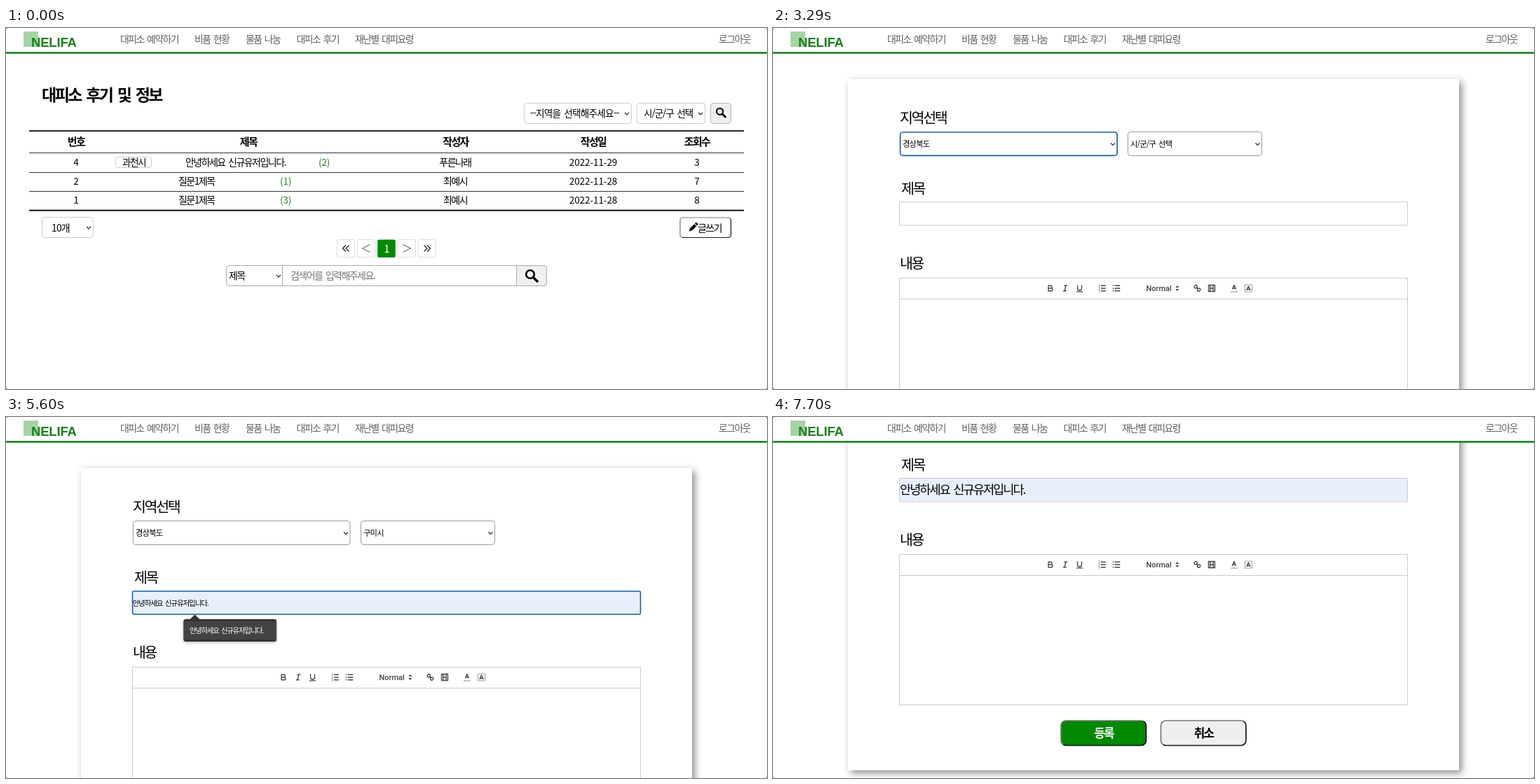
Animation of 1086 by 516 pixels, one loop 8 s. Source, as an HTML page with a canvas:

```html
<!DOCTYPE html>
<html lang="ko">
<head>
<meta charset="utf-8">
<title>대피소 후기</title>
<style>
html, body { margin: 0; width: 100%; height: 100%; overflow: hidden; background: #fff; }
canvas { display: block; }
</style>
</head>
<body>
<canvas id="stage" width="1086" height="516"></canvas>
<script>
const W = 1086, H = 516, LOOP = 8000, STEP = 70;
const SANS = '"Noto Sans CJK KR", "Noto Sans CJK JP", "Noto Sans CJK", sans-serif';
const GREEN = '#028802', DARK_GREEN = '#1b7f1b', BLUE = '#1a5f9f', FILL = '#e8f0fe';
const REGION_HINT = '--지역을 선택해주세요--', CITY_HINT = '시/군/구 선택';
const GREETING = '안녕하세요 신규유저입니다.';
const REGIONS = [REGION_HINT, ...('서울특별시 부산광역시 대구광역시 인천광역시 광주광역시 대전광역시 울산광역시 ' +
  '세종특별자치시 경기도 강원도 충청북도 충청남도 전라북도 전라남도 경상북도 경상남도 제주특별자치도').split(' ')];
const CITIES = [CITY_HINT, ...('경산시 경주시 구미시 김천시 문경시 상주시 안동시 영주시 영천시 포항시 고령군 군위군 ' +
  '봉화군 성주군 영덕군 영양군 예천군 울릉군 울진군 의성군 청도군 청송군 칠곡군').split(' ')];

const main = document.getElementById('stage').getContext('2d');
const layerCanvas = Object.assign(document.createElement('canvas'), { width: W, height: H });
const layer = layerCanvas.getContext('2d');
let g = main;

// y is the vertical centre of the glyphs; sp is letter spacing in em
function text(s, x, y, size, o = {}) {
  const hangul = /[가-힣]/.test(s);
  g.font = `${o.weight || 400} ${size}px ${o.font || SANS}`;
  g.letterSpacing = (o.sp ?? (hangul ? -0.11 : -0.01)) * size + 'px';
  g.wordSpacing = (hangul ? 0.2 * size : 0) + 'px';
  g.textAlign = o.align || 'left';
  g.fillStyle = o.color || '#000';
  g.fillText(s, x, y + size * 0.37);
}
const mid = (s, x, y, size, o) => text(s, x, y, size, { align: 'center', ...o });

function rect(x, y, w, h, color) {
  g.fillStyle = color;
  g.fillRect(x, y, w, h);
}

function box(x, y, w, h, r, stroke, fill, lw = 1) {
  g.beginPath();
  g.roundRect(x, y, w, h, r);
  if (fill) { g.fillStyle = fill; g.fill(); }
  if (stroke) { g.strokeStyle = stroke; g.lineWidth = lw; g.stroke(); }
}

function line(points, color, lw) {
  g.beginPath();
  points.forEach(([x, y]) => g.lineTo(x, y));
  g.strokeStyle = color;
  g.lineWidth = lw;
  g.stroke();
}

const chevron = (x, y) => line([[x - 3, y - 1.5], [x, y + 1.5], [x + 3, y - 1.5]], '#222', 1.1);
const angle = (x, y, w, h, color, lw) => line([[x + w, y - h], [x, y], [x + w, y + h]], color, lw);

function magnifier(x, y, r) {
  g.beginPath();
  g.arc(x, y, r, 0, 7);
  g.strokeStyle = '#000';
  g.lineWidth = r * 0.45;
  g.stroke();
  line([[x + r * 0.75, y + r * 0.75], [x + r * 1.9, y + r * 1.9]], '#000', r * 0.58);
}

// Border lit from the top left, split along the rising diagonal
function bevel(x, y, w, h, r, fill, lw) {
  const cx = x + w / 2, cy = y + h / 2;
  const shade = g.createLinearGradient(cx - h, cy - w, cx + h, cy + w);
  shade.addColorStop(0.5, '#767676');
  shade.addColorStop(0.5, '#151515');
  box(x, y, w, h, r, shade, fill, lw);
}

function header() {
  rect(0, 0, W, 34.3, '#fff');
  rect(0, 34.2, W, 2.6, DARK_GREEN);
  rect(25, 5, 21, 22, '#a5d3a5');
  text('NELIFA', 36, 20.5, 18.5, { weight: 700, color: DARK_GREEN, font: '"Liberation Sans", sans-serif' });
  [['대피소 예약하기', 163], ['비품 현황', 269], ['물품 나눔', 342], ['대피소 후기', 414.5],
    ['재난별 대피요령', 498], ['로그아웃', 1017]].forEach(([s, x]) => text(s, x, 16.3, 13.9, { color: '#606060' }));
}

function listPage() {
  text('대피소 후기 및 정보', 51, 95, 23, { weight: 700 });
  box(739.5, 107.5, 153, 29, 4, '#ccc');
  text(REGION_HINT, 748, 122, 13.7, { sp: -0.06 });
  chevron(886, 122.5);
  box(900.5, 107.5, 97, 29, 4, '#ccc');
  text(CITY_HINT, 910, 122, 13.6, { sp: -0.08 });
  chevron(991, 122.5);
  box(1005.5, 107.5, 29, 29, 4, '#b0b4ba', '#efefef');
  magnifier(1018.7, 119.3, 4.6);

  rect(33, 146.2, 1020, 1.8, '#111');
  [['번호', 100], ['제목', 346], ['작성자', 641.5], ['작성일', 838], ['조회수', 986]]
    .forEach(([s, x]) => mid(s, x, 162, 15, { weight: 700 }));
  [178, 206, 233].forEach(y => rect(33, y, 1020, 1, '#333'));
  rect(33, 259.7, 1020, 2, '#111');

  box(156.5, 184.5, 51, 15, 3, '#ccc');
  mid('과천시', 182.5, 192, 13.8);
  [['4', GREETING, 256, '(2)', 446, '푸른나래', '2022-11-29', '3'],
    ['2', '질문1제목', 246, '(1)', 391, '최예시', '2022-11-28', '7'],
    ['1', '질문1제목', 246, '(3)', 391, '최예시', '2022-11-28', '8']].forEach((r, i) => {
    const y = 192 + i * 27;
    mid(r[0], 100, y, 13.6);
    text(r[1], r[2], y, 14);
    text(r[3], r[4], y, 13.6, { color: '#2b802b' });
    mid(r[5], 641, y, 14);
    mid(r[6], 838, y, 13.6);
    mid(r[7], 986, y, 13.6);
  });

  box(51.5, 270.5, 73, 29, 4, '#ccc');
  text('10개', 65, 285.5, 14, { sp: -0.06 });
  chevron(118, 285.5);
  bevel(962, 271, 72.5, 28.5, 4, '#fff', 1.2);
  g.fillStyle = '#000';
  g.fill(new Path2D('M975 290.5l.7-3.7 6.6-6.6 3 3-6.6 6.6zM983 279.5l1.2-1.2q.9-.6 1.7.1l1.3 1.3q.6.8 0 1.6l-1.2 1.2z'));
  text('글쓰기', 987, 285.5, 14);

  [472.5, 501.4, 559.2, 588.1].forEach(x => box(x, 302.5, 25, 25, 2, '#ddd'));
  box(530.2, 302.4, 25.6, 25.6, 2, null, GREEN);
  mid('1', 543.3, 315, 15, { color: '#fff' });
  [0, 4.5].forEach(d => {
    angle(480.5 + d, 315, 4.5, 4.5, '#222', 1.3);
    angle(605.5 - d, 315, -4.5, 4.5, '#222', 1.3);
  });
  angle(508.5, 315, 11, 5.5, '#555', 1);
  angle(577.5, 315, -11, 5.5, '#555', 1);

  box(314.5, 339.5, 457, 29, 4, '#aaa');
  box(728.5, 339.5, 43, 29, [0, 4, 4, 0], '#aaa', '#efefef');
  rect(394, 340, 1, 29, '#aaa');
  text('제목', 318, 354, 14, { weight: 500 });
  chevron(389, 354.5);
  text('검색어를 입력해주세요.', 406, 354, 14, { color: '#757575' });
  magnifier(748, 352, 5.8);
}

const ICONS = [
  [396, 'M5 4H9.5a2.5 2.5 0 0 1 0 5H5zM5 9h5.5a2.5 2.5 0 0 1 0 5H5z'],
  [417, 'M7 4h6M5 14h6M8 14l2-10'],
  [437.5, 'M5 3v6a4 4 0 0 0 8 0V3M3 15.5h12'],
  [469.5, 'M7 4h9M7 9h9M7 14h9'],
  [490, 'M6 4h10M6 9h10M6 14h10M2 4h2M2 9h2M2 14h2'],
  [605.5, 'M7 7l4 4M8.9 4.6a3.5 3.5 0 0 1-4.3 4.3C3.2 7.5 2 6.4 4.2 4.2S7.5 3.2 8.9 4.6zM13.4 9.1a3.5 3.5 0 0 0-4.3 4.3c1.4 1.4 2.5 2.5 4.7.4S14.8 10.5 13.4 9.1z'],
  [626, 'M3 3h12v12H3zM6 3v12M12 3v12M6 9h6'],
  [658, 'M5.5 11L9 3l3.5 8M6.4 9h5.2'],
  [678.5, 'M5.5 13L9 5l3.5 8M6.4 11h5.2']
].map(([x, d]) => [x, new Path2D(d)]);

function toolbar(y) {
  ICONS.forEach(([x, path]) => {
    g.save();
    g.translate(x - 6.75, y - 6.75);
    g.scale(0.75, 0.75);
    g.strokeStyle = '#444';
    g.lineWidth = 1.8;
    g.lineJoin = 'round';
    g.stroke(path);
    g.restore();
  });
  [-4, 0, 4].forEach((d, i) => mid(String(i + 1), 465.5, y + d, 4.5, { color: '#444' }));
  rect(653, y + 4.5, 10, 1, '#888');
  g.setLineDash([1, 1]);
  box(673.5, y - 5, 10, 10, 0, '#444');
  g.setLineDash([]);
  text('Normal', 532.5, y, 11, { weight: 500, color: '#444', font: 'Roboto, sans-serif', sp: 0 });
  g.fillStyle = '#444';
  [-1, 1].forEach(d => {
    g.beginPath();
    g.moveTo(574.3, y + d);
    g.lineTo(579.3, y + d);
    g.lineTo(576.8, y + d * 4);
    g.fill();
  });
}

function select(x, w, value, focused) {
  if (focused) box(x + 0.6, 149, w - 0.4, 33.4, 4, BLUE, '#fff', 1.7);
  else box(x + 0.5, 148.5, w - 0.5, 34, 4, '#999', '#fff');
  text(value, x + 4, 165.5, 11.3, { sp: -0.07 });
  chevron(x + w - 6, 166);
}

function titleField(t) {
  const focused = t >= 4550 && t < 6300;
  const fill = t >= 5600 ? FILL : '#fff';
  if (focused) box(180.5, 249, 725, 33, 2, BLUE, fill, 1.6);
  else box(180.5, 248.5, 725, 33.5, 0, '#ccc', fill);
  if (t >= 5880) text(GREETING, 181, 264.7, 17.5);
  else if (t >= 5600) text(GREETING, 180.5, 266.5, 10.6);
}

function suggestion(hover) {
  g.save();
  g.shadowColor = 'rgba(0,0,0,.35)';
  g.shadowBlur = 4;
  g.shadowOffsetY = 1;
  box(253.5, 289, 132.5, 32, 3, null, '#343436');
  g.restore();
  g.fillStyle = '#343436';
  g.beginPath();
  g.moveTo(261.5, 290);
  g.lineTo(269.5, 282.5);
  g.lineTo(277.5, 290);
  g.fill();
  if (hover) rect(253.5, 292, 132.5, 26, '#434345');
  text(GREETING, 262, 305.5, 10.3, { color: '#fff' });
}

function formPage(t, scroll) {
  g.save();
  g.translate(0, -scroll);
  g.save();
  g.shadowColor = 'rgba(0,0,0,.45)';
  g.shadowBlur = 10;
  g.shadowOffsetX = g.shadowOffsetY = 3.5;
  rect(107, 73, 872, 593, '#fff');
  g.restore();

  text('지역선택', 181, 128, 20.5);
  select(181, 310, t < 3290 ? REGION_HINT : '경상북도', t >= 3290 && t < 3430);
  select(506, 191.5, t < 4340 ? CITY_HINT : '구미시', t >= 4340 && t < 4550);
  text('제목', 183, 229.5, 20.5);
  titleField(t);
  text('내용', 181, 336.5, 20.5);
  box(180.5, 357.5, 725, 215, 0, '#ccc');
  rect(181, 387, 725, 1, '#ccc');
  toolbar(372);
  bevel(411, 595, 121.5, 35.5, 7, GREEN, 1.7);
  mid('등록', 472, 612.3, 17, { weight: 700, color: '#fff' });
  bevel(553.5, 595, 121.5, 35.5, 7, '#efefef', 1.7);
  mid('취소', 614.5, 612.3, 17, { weight: 700 });
  if (t >= 4620 && t < 5880) suggestion(t >= 5600);
  g.restore();
}

function menu(x, w, items, active, alpha) {
  const pitch = 16.25, top = 166;
  layer.clearRect(0, 0, W, H);
  g = layer;
  g.save();
  g.shadowColor = 'rgba(0,0,0,.35)';
  g.shadowBlur = 6;
  box(x, 153, w, items.length * pitch + 10, 5, null, '#4a4a49');
  g.restore();
  if (items === CITIES) rect(x, 497, w, 19, 'rgba(50,50,90,.2)');
  box(x + 4, top + active * pitch - 8, w - 8, 16, 3, null, '#4189e7');
  line([[x + 8, 167], [x + 10, 169.5], [x + 14, 163]], '#fff', 1.4);
  items.forEach((s, i) => text(s, x + 18, top + i * pitch, 10.2, { color: '#fff' }));
  g = main;
  g.globalAlpha = alpha;
  g.drawImage(layerCanvas, 0, 0);
  g.globalAlpha = 1;
}

// Opens, runs down to the choice in three steps, then fades out
function timedMenu(t, start, x, w, items, choice) {
  const k = Math.floor((t - start) / STEP);
  if (k < 0 || k > 4) return;
  const active = Math.round(choice * Math.min(k, 2) / 2);
  menu(x, w, items, active, [1, 1, 1, 0.5, 0.2][k]);
}

const scrollAt = k => k < 0 ? 0 : Math.round(161 * (1 - 0.68 * 0.64 ** k));

function scrollbar(t, k) {
  if (k < 0 || t >= 7700) return;
  const fade = t < 7490 ? 1 : 0.75 - 0.25 * Math.floor((t - 7490) / STEP);
  g.globalAlpha = fade;
  box(1079, 2 + scrollAt(k + 1) / 161 * 96, 6, 416, 3, null, '#7b7b7b');
  g.globalAlpha = 1;
}

function corners() {
  g.beginPath();
  g.rect(0, 0, W, H);
  g.roundRect(0, 0, W, H, 3);
  g.fillStyle = '#777';
  g.fill('evenodd');
}

function draw(t) {
  rect(0, 0, W, H, '#fff');
  if (t < 1470) {
    listPage();
    header();
  } else {
    const k = Math.floor((t - 6720) / STEP);
    formPage(t, scrollAt(k));
    header();
    timedMenu(t, 2940, 175, 311, REGIONS, 15);
    timedMenu(t, 3990, 500, 192, CITIES, 3);
    scrollbar(t, k);
  }
  corners();
}

const begin = performance.now();
function tick() {
  draw((performance.now() - begin) % LOOP);
  requestAnimationFrame(tick);
}
tick();
</script>
</body>
</html>
```
